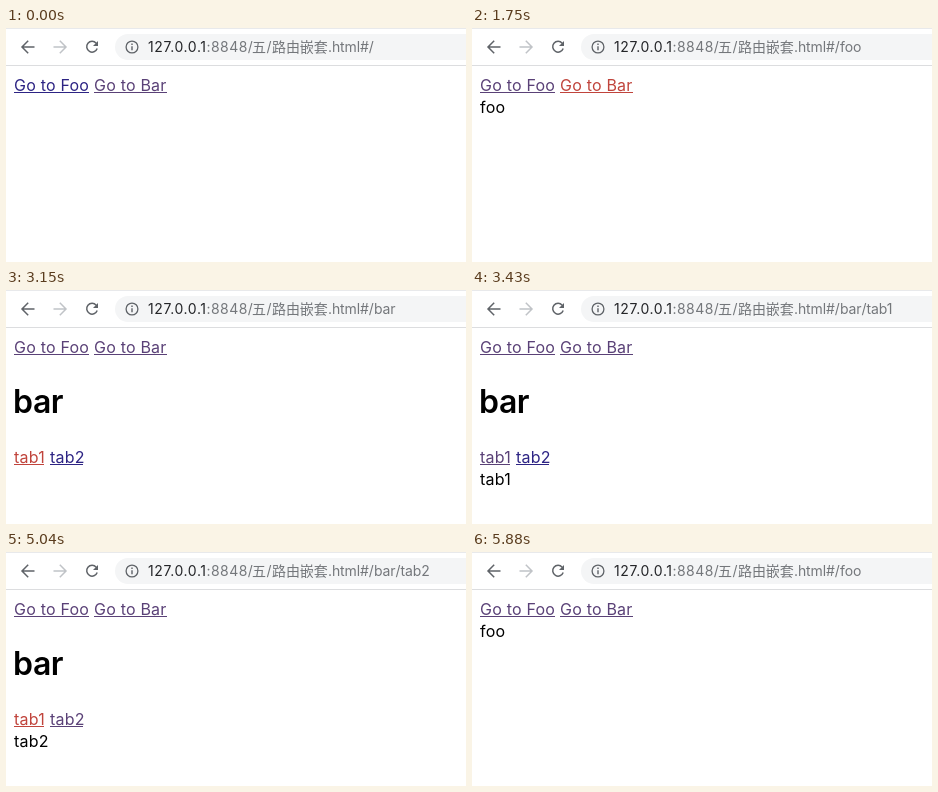
An HTML page that plays this animation: 460x234 px, repeating every 6020 ms.

```html
<!DOCTYPE html>
<html lang="zh">
<head>
<meta charset="utf-8">
<title>Nested routes</title>
<style>
  html, body { margin: 0; width: 100%; height: 100%; overflow: hidden; background: #fff; }
  svg { display: block; width: 460px; height: 234px; }
  text { font-family: Inter, "Noto Sans CJK SC", "Noto Sans CJK", sans-serif; font-size: 16px; letter-spacing: .2px; font-optical-sizing: none; white-space: pre; }
  .url text { font-size: 14px; letter-spacing: -.1px; fill: #74777b; }
  .url .host { letter-spacing: .6px; fill: #242528; }
  .url .port { letter-spacing: .45px; }
  .title { font-size: 32px; font-weight: 600; letter-spacing: -.4px; }
  .icon { fill: none; stroke: #5f6368; stroke-width: 1.5; }

  /* One loop is 86 ticks of 70 ms; every change is hard. */
  svg { --new: #2d2484; --seen: #5a4177; --hot: #c0443c; }
  .link { fill: var(--seen); }
  .link, .view { animation: 6020ms step-end infinite; }
  .view { visibility: hidden; }

  .to-foo { animation-name: to-foo; }
  .to-bar { animation-name: to-bar; }
  .to-tab1 { animation-name: to-tab1; }
  .to-tab2 { animation-name: to-tab2; }
  .foo { animation-name: foo; }
  .bar { animation-name: bar; }
  .tab1 { animation-name: tab1; }
  .tab2 { animation-name: tab2; }

  @keyframes to-foo {
    0%, 9.302% { fill: var(--new); }
    8.139%, 96.511% { fill: var(--hot); }
    11.627%, 97.674%, 100% { fill: var(--seen); }
  }
  @keyframes to-bar {
    0%, 31.395%, 100% { fill: var(--seen); }
    29.069% { fill: var(--hot); }
  }
  @keyframes to-tab1 {
    0%, 53.488% { fill: var(--new); }
    52.325%, 83.72% { fill: var(--hot); }
    56.976%, 84.883%, 100% { fill: var(--seen); }
  }
  @keyframes to-tab2 {
    0%, 68.604% { fill: var(--new); }
    67.441% { fill: var(--hot); }
    70.93%, 100% { fill: var(--seen); }
  }
  @keyframes foo {
    0%, 31.395% { visibility: hidden; }
    9.302%, 97.674%, 100% { visibility: visible; }
  }
  @keyframes bar {
    0%, 97.674%, 100% { visibility: hidden; }
    31.395% { visibility: visible; }
  }
  @keyframes tab1 {
    0%, 68.604%, 97.674%, 100% { visibility: hidden; }
    53.488%, 84.883% { visibility: visible; }
  }
  @keyframes tab2 {
    0%, 84.883%, 100% { visibility: hidden; }
    68.604% { visibility: visible; }
  }
</style>
</head>
<body>
<svg viewBox="0 0 460 234">
  <rect width="460" height="234" fill="#fff"/>
  <rect width="460" height="1" fill="#e8e9eb"/>
  <rect y="37" width="460" height="1" fill="#dcdddf"/>
  <rect x="109" y="6" width="380" height="26" rx="13" fill="#f4f5f6"/>

  <g class="icon">
    <path d="M28.5 19H16.5M22.2 12.8L16 19l6.2 6.2"/>
    <path stroke="#c0c3c7" d="M47.5 19h12M53.8 12.8L60 19l-6.2 6.2"/>
    <path d="M90.2 15.2A5.4 5.4 0 1 0 91.2 20.6"/>
    <path fill="#5f6368" stroke="none" d="M92 13v5h-5z"/>
    <circle cx="126" cy="19" r="5.9" stroke-width="1.3"/>
    <path stroke-width="1.4" d="M126 18.3v4M126 15.6v1.4"/>
  </g>

  <g class="url">
    <text class="host" x="142" y="24">127.0.0.1</text>
    <text class="port" x="200.5" y="24">:8848/</text>
    <text x="246" y="24">五</text>
    <text x="260.5" y="24">/</text>
    <text x="266" y="24">路由嵌套</text>
    <text x="322" y="24">.html#/</text>
    <text class="view foo" x="368" y="24">foo</text>
    <text class="view bar" x="368" y="24">bar</text>
    <text class="view tab1" x="389.5" y="24">/tab1</text>
    <text class="view tab2" x="389.5" y="24">/tab2</text>
  </g>

  <g class="link to-foo"><text x="8" y="63">Go to Foo</text><rect x="8" y="64" width="75" height="1"/></g>
  <g class="link to-bar"><text x="88" y="63">Go to Bar</text><rect x="88" y="64" width="73" height="1"/></g>

  <text class="view foo" x="8" y="85">foo</text>

  <g class="view bar">
    <text class="title" x="7" y="123">bar</text>
    <g class="link to-tab1"><text x="8" y="173">tab1</text><rect x="8" y="174" width="30" height="1"/></g>
    <g class="link to-tab2"><text x="44" y="173">tab2</text><rect x="44" y="174" width="33" height="1"/></g>
  </g>
  <text class="view tab1" x="8" y="195">tab1</text>
  <text class="view tab2" x="8" y="195">tab2</text>
</svg>
</body>
</html>
```
